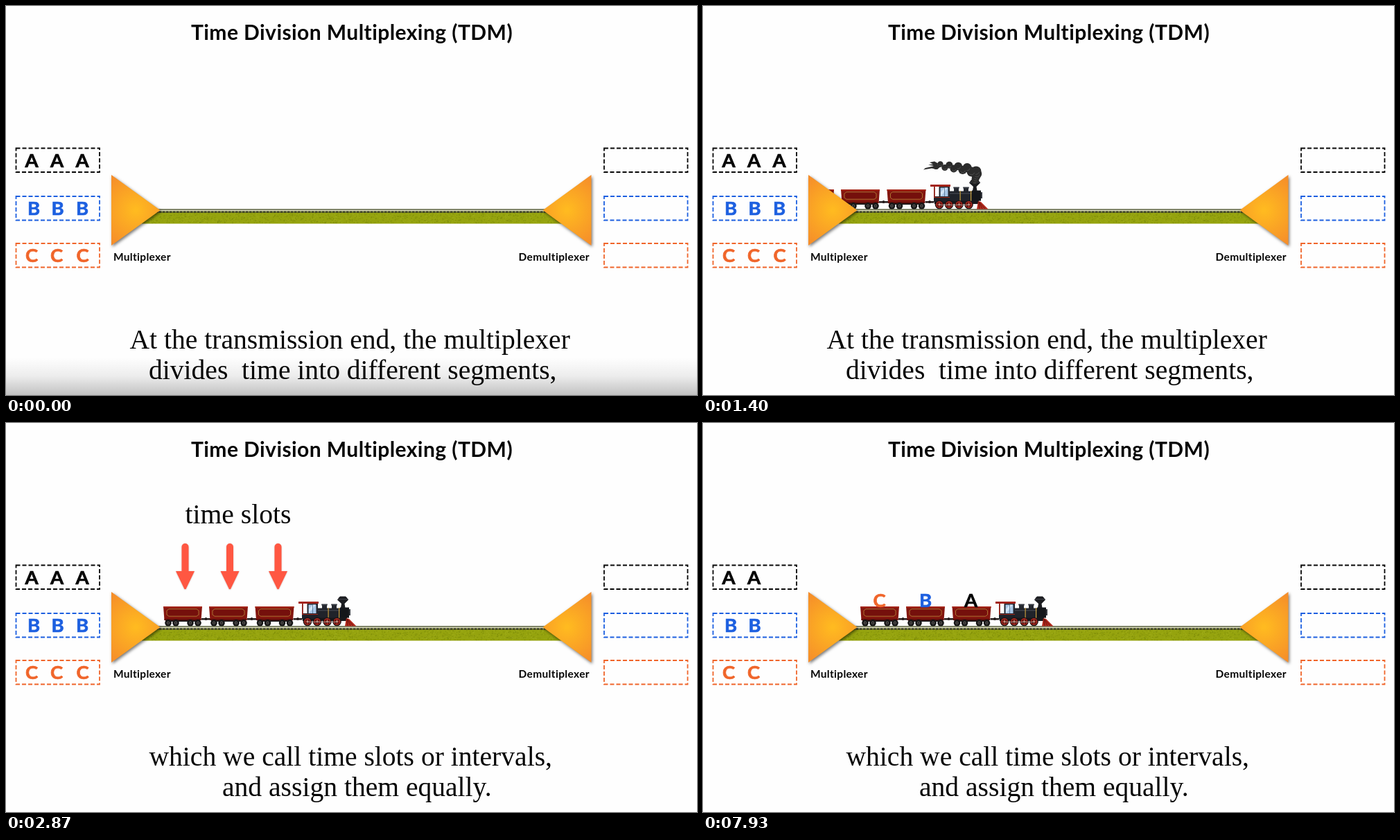
Write an HTML page with a canvas that moves like this. It is 997 px wide and 562 px high and loops after 8000 ms.

```html
<!DOCTYPE html>
<html lang="en">
<head>
<meta charset="utf-8">
<title>Time Division Multiplexing</title>
<style>
  html, body { margin: 0; width: 100%; height: 100%; overflow: hidden; background: #fefefe; }
  canvas { display: block; }
</style>
</head>
<body>
<canvas id="stage" width="997" height="562"></canvas>
<script>
const ctx = document.getElementById('stage').getContext('2d');
const LOOP = 8000, STEP = 1000 / 15;
const BLACK = '#050505', BLUE = '#1c5fe0', ORANGE = '#f0652a';
const SERIF = '39.6px "Liberation Serif", "Times New Roman", serif';
const sans = size => `bold ${size}px Lato, "Century Gothic", sans-serif`;

const clamp = v => Math.max(0, Math.min(1, v));
const ease = p => p * p * (3 - 2 * p);

function text(str, x, y, font, color = BLACK, align = 'left', spacing = 0) {
  ctx.font = font;
  ctx.fillStyle = color;
  ctx.textAlign = align;
  ctx.letterSpacing = spacing + 'px';
  ctx.fillText(str, x, y);
}

function letter(name, x, y, color) {
  text(name, x, y, sans(27.5), color, 'center');
  ctx.lineWidth = 0.7;
  ctx.strokeStyle = color;
  ctx.strokeText(name, x, y);
}

function rect(x, y, w, h, color) {
  ctx.fillStyle = color;
  ctx.fillRect(x, y, w, h);
}

function poly(color, ...pts) {
  ctx.beginPath();
  for (let i = 0; i < pts.length; i += 2) ctx.lineTo(pts[i], pts[i + 1]);
  ctx.closePath();
  ctx.fillStyle = color;
  ctx.fill();
}

function disc(x, y, r, color) {
  ctx.beginPath();
  ctx.arc(x, y, r, 0, Math.PI * 2);
  ctx.fillStyle = color;
  ctx.fill();
}

function randomizer(seed) {
  return () => (seed = (seed * 16807) % 2147483647) / 2147483647;
}

const rows = [
  { name: 'A', color: BLACK, y: 205.5, xs: [37, 73.5, 110], goal: [386.5, 266] },
  { name: 'B', color: BLUE, y: 275, xs: [40, 74.5, 110], goal: [321, 266] },
  { name: 'C', color: ORANGE, y: 343, xs: [37, 73, 110.5], goal: [254.5, 266] }
];

function drawRows() {
  for (const { name, color, y, xs } of rows) {
    ctx.lineWidth = 1.8;
    ctx.strokeStyle = color;
    ctx.setLineDash([6, 3]);
    ctx.strokeRect(14.5, y, 120.5, 34.5);
    ctx.strokeRect(863, y, 120.5, 34.5);
    ctx.setLineDash([]);
    for (const x of xs.slice(0, 2)) letter(name, x, y + 27, color);
  }
}

function drawMovingLetters(t) {
  const p = ease(clamp((t - 7000) / 730));
  for (const { name, color, y, xs, goal } of rows) {
    const x0 = xs[2], y0 = y + 27;
    letter(name, x0 + (goal[0] - x0) * p, y0 + (goal[1] - y0) * p, color);
  }
}

function drawTrack() {
  const rnd = randomizer(77);
  rect(196, 293, 606, 2, '#7f8468');
  rect(196, 295, 606, 1.5, '#d8d8bc');
  rect(196, 296.5, 606, 3, '#77822a');
  for (let x = 196; x < 802; x += 5) rect(x, 296.5, 3.4, 2, '#2e3024');
  rect(196, 299, 606, 15.5, '#95a30e');
  for (let i = 0; i < 1500; i++) {
    const tone = rnd() < 0.5 ? 'rgba(90,105,0,.25)' : 'rgba(180,190,50,.25)';
    rect(196 + rnd() * 604, 299 + rnd() * 14, 1.5, 1.2, tone);
  }
}

function drawTriangle(base, tip) {
  const mid = (base + tip) / 2;
  const g = ctx.createRadialGradient(mid, 295, 2, mid, 295, 60);
  g.addColorStop(0, '#ffba20');
  g.addColorStop(1, '#f58c2a');
  ctx.save();
  ctx.shadowColor = 'rgba(0,0,0,.55)';
  ctx.shadowBlur = 4;
  ctx.shadowOffsetX = 1.5;
  ctx.shadowOffsetY = 2;
  poly(g, base, 244, base, 346, tip, 295);
  ctx.restore();
}

function drawWagon(x) {
  rect(x + 55, 282, 13, 2.5, '#231a1a');
  disc(x + 61.5, 283, 2, '#231a1a');
  rect(x + 3, 283, 50, 4, '#1b1617');
  poly('#84160f', x, 265, x + 56, 265, x + 54.5, 285, x + 1.5, 285);
  rect(x, 265, 56, 2, '#a52619');
  rect(x + 1.5, 282.8, 53, 2, '#5e0c09');
  ctx.beginPath();
  [[5, 271], [8, 268.8], [48, 268.8], [51, 271], [51, 277], [48, 279.2], [8, 279.2], [5, 277]]
    .forEach(([dx, y]) => ctx.lineTo(x + dx, y));
  ctx.closePath();
  ctx.fillStyle = '#75100c';
  ctx.fill();
  ctx.lineWidth = 0.9;
  ctx.strokeStyle = '#b07a35';
  ctx.stroke();
  for (const dx of [7, 18, 39, 50]) {
    disc(x + dx, 288.8, 4.8, '#171717');
    disc(x + dx, 288.8, 2.2, '#5a5655');
    disc(x + dx, 288.8, 1.1, '#1a1a1a');
  }
}

function drawEngine() {
  rect(428, 281, 64, 5, '#17181c');
  // cab
  rect(427, 275, 23, 8, '#1e2128');
  rect(427, 261, 1.8, 15, '#8d1c14');
  rect(434.5, 261, 15.5, 16, '#23262f');
  rect(436.5, 262.5, 11, 12.5, '#a9c8e8');
  poly('#d3e5f6', 437, 275, 437, 269, 443, 262.5, 447, 262.5);
  rect(442, 262.5, 0.9, 12.5, '#5c7693');
  rect(422, 258, 29, 3, '#a3241a');
  rect(427, 276, 23, 1, '#9d2a1c');
  // boiler
  rect(450, 267.5, 40, 14, '#20232a');
  rect(450, 270, 40, 1.5, '#3d4149');
  for (const x of [456, 470]) {
    rect(x, 263, 7, 5, '#24272e');
    rect(x - 0.8, 261.5, 8.6, 2, '#373b43');
  }
  for (const x of [464.5, 480]) rect(x, 267, 1.2, 15, '#c49a3b');
  rect(482, 266.5, 13, 15, '#14161a');
  rect(495, 269, 2, 9, '#3a3d44');
  // chimney
  poly('#1b1c20', 483, 267, 484, 261, 478, 255.5, 480, 252.5, 482, 250.5,
    490, 250.5, 492, 252.5, 494, 255.5, 488.5, 261, 489.5, 267);
  rect(479, 254, 14.5, 1.2, '#3b3d43');
  // cowcatcher
  poly('#b32a1d', 491, 282, 495, 283, 505.5, 293.5, 489, 293.5);
  ctx.lineWidth = 0.8;
  ctx.strokeStyle = '#5e0f0a';
  ctx.beginPath();
  for (const x of [493, 497, 501]) {
    ctx.moveTo(492, 283);
    ctx.lineTo(x, 293);
  }
  ctx.stroke();
  for (const x of [435, 449, 463.5, 477.5]) {
    disc(x, 287, 6.3, '#1a1517');
    disc(x, 287, 5, '#a9271d');
    disc(x, 287, 3.6, '#5a1411');
    rect(x - 4.5, 286.5, 9, 1, '#b8372b');
    rect(x - 0.5, 282.5, 1, 9, '#b8372b');
    disc(x, 287, 1.4, '#d3a08e');
  }
  rect(435, 287, 43, 1, '#8d8580');
}

// A lumpy plume: a short column over the chimney, then puffs thinning to the left.
function drawSmoke() {
  const dark = '#2c2c2c';
  const puff = (x, y, r) => {
    disc(x, y, r, dark);
    ctx.beginPath();
    ctx.arc(x, y, r * 0.6, 0.3, 2.4);
    ctx.lineWidth = 0.7;
    ctx.strokeStyle = '#5c5c5c';
    ctx.stroke();
  };
  for (let i = 0; i < 4; i++) puff(486 + i, 253 - i * 3.5, 4.5 + i * 0.9);
  for (let i = 0; i < 10; i++) {
    const p = i / 9;
    const wobble = i % 2 ? 2.2 : -2.2;
    puff(488 - 58 * p, 241 - 11 * Math.sqrt(p) + wobble, 7.4 - 3.6 * p);
  }
  poly(dark, 434, 228, 428, 224.5, 421, 226, 426, 228.5, 419, 229.5, 427, 231);
  poly(dark, 438, 231, 426, 231.5, 415, 234, 412, 236.5, 424, 234.5, 432, 236);
}

function drawTrain(t) {
  const shift = Math.min(0, (t - 1400) * 0.573 - 94);
  ctx.save();
  ctx.beginPath();
  ctx.rect(155, 200, 700, 110);
  ctx.clip();
  ctx.translate(shift, 0);
  for (const x of [227, 293, 359.5]) drawWagon(x);
  drawEngine();
  if (t < 1660) drawSmoke();
  ctx.restore();
}

function drawArrow(x) {
  ctx.save();
  ctx.shadowColor = 'rgba(120,40,30,.35)';
  ctx.shadowBlur = 2;
  ctx.shadowOffsetY = 0.5;
  ctx.beginPath();
  ctx.moveTo(x - 5, 214);
  ctx.lineTo(x - 5, 179);
  ctx.arc(x, 179, 5, Math.PI, 0);
  ctx.lineTo(x + 5, 214);
  ctx.lineTo(x + 13.5, 214);
  ctx.lineTo(x + 1, 240);
  ctx.lineTo(x - 1, 240);
  ctx.lineTo(x - 13.5, 214);
  ctx.closePath();
  ctx.fillStyle = '#ff5742';
  ctx.fill();
  ctx.restore();
}

function drawCaptions(t) {
  if (t < 1725) {
    text('At the transmission end, the multiplexer', 178.5, 495, SERIF);
    text('divides  time into different segments,', 206, 539, SERIF);
  } else if (t > 2860) {
    text('which we call time slots or intervals,', 206.5, 495, SERIF);
    text('and assign them equally.', 312, 539, SERIF);
  }
  if (t > 1725 && t < 6925) text('time slots', 258.5, 145, SERIF);
}

const arrows = [
  { x: 258.5, from: 1795, to: 6925 },
  { x: 323, from: 1860, to: 6925 },
  { x: 392.5, from: 1995, to: 6995 }
];

function drawShade(t) {
  const alpha = 0.24 * clamp(1 - (t - 800) / 200);
  if (!alpha) return;
  const g = ctx.createLinearGradient(0, 508, 0, 562);
  g.addColorStop(0, 'rgba(0,0,0,0)');
  g.addColorStop(0.5, `rgba(0,0,0,${alpha * 0.3})`);
  g.addColorStop(1, `rgba(0,0,0,${alpha})`);
  rect(0, 508, 997, 54, g);
}

function draw(t) {
  rect(0, 0, 997, 562, '#fefefe');
  drawShade(t);
  text('Time Division Multiplexing (TDM)', 267, 49, sans(30), BLACK, 'left', 0.43);
  drawRows();
  drawTrack();
  if (t > 860) drawTrain(t);
  drawTriangle(152, 222.5);
  drawTriangle(844.5, 774.5);
  text('Multiplexer', 155, 368, sans(15.5), BLACK, 'left', 0.3);
  text('Demultiplexer', 739.5, 368, sans(15.5), BLACK, 'left', 0.35);
  drawMovingLetters(t);
  for (const a of arrows) if (t > a.from && t < a.to) drawArrow(a.x);
  drawCaptions(t);
}

function tick() {
  const t = performance.now() % LOOP;
  draw(Math.floor((t + 4) / STEP) * STEP);
  requestAnimationFrame(tick);
}
tick();
</script>
</body>
</html>
```
